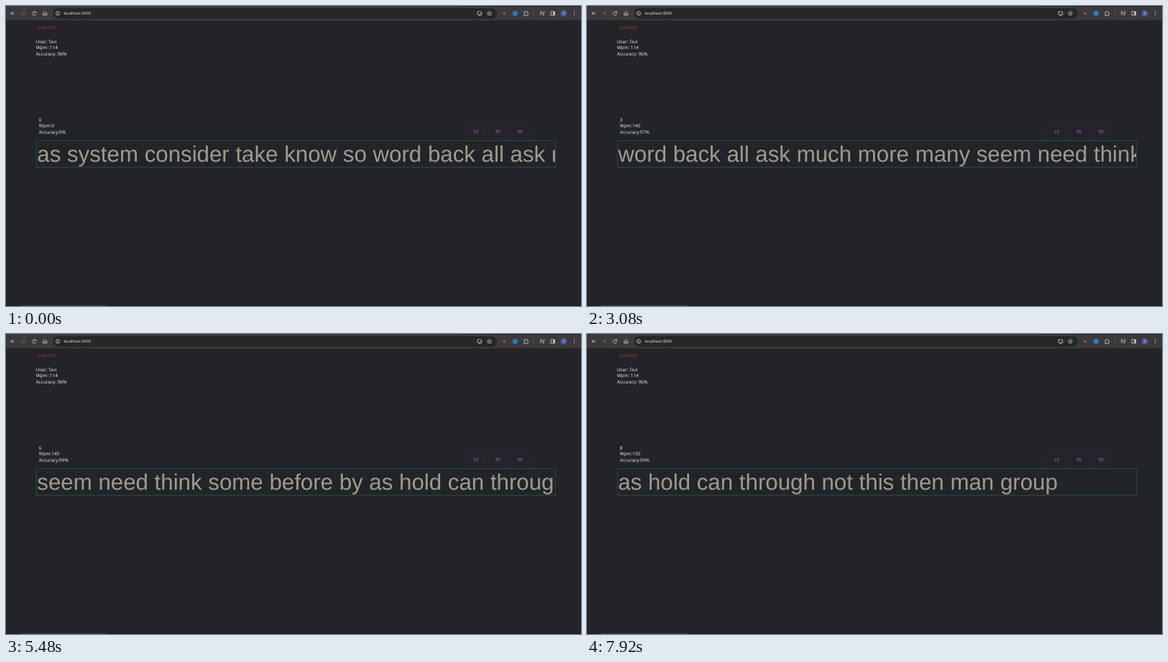
An HTML page for the animation above (8 s loop, 800 px wide and 418 px high).

```html
<!DOCTYPE html>
<html lang="en">
<head>
<meta charset="utf-8">
<title>Typing test</title>
<style>
  html, body { margin: 0; width: 100%; height: 100%; overflow: hidden; background: #222428; }
  svg { display: block; }
  text { white-space: pre; text-rendering: geometricPrecision; }
  .ui { font: 6.4px "Noto Sans", "Open Sans", sans-serif; fill: #e8e8e8; }
  .arial { font-family: "Liberation Sans", Arial, sans-serif; }
  .line { font-size: 31.25px; fill: #a09a8f; }
  .icon { fill: none; stroke: #cfcdcf; stroke-width: .8; }
  .pick rect { fill: none; stroke: #3b2842; stroke-width: .8; }
  .pick text { font-size: 6.6px; font-weight: bold; fill: #963fa6; text-anchor: middle; }
  .pointer { fill: none; stroke: #787878; stroke-width: .6; mix-blend-mode: difference; }
</style>
</head>
<body>
<svg width="800" height="418" viewBox="0 0 800 418">
  <rect width="800" height="418" fill="#222428"/>

  <!-- browser bar -->
  <rect width="800" height="20" fill="#3b393c"/>
  <path d="M630 .5H800" stroke="#2c2a2d"/>
  <rect x="65" y="3" width="618" height="15" rx="7.5" fill="#272628"/>
  <g class="icon">
    <path d="M12 10.2H7M9.3 7.8L6.9 10.2L9.3 12.6"/>
    <path d="M21.5 10.2h5M24.2 7.8l2.4 2.4l-2.4 2.4" stroke="#78767a"/>
    <path d="M41 8.6A2.5 2.5 0 1 0 41.6 11M41.7 7.2V9.2H39.6"/>
    <path d="M51.8 9.6L54.3 7.5L56.8 9.6V12.9H55.2V10.8H53.4V12.9H51.8Z"/>
    <circle cx="72" cy="10.3" r="2.6"/>
    <path d="M72 9.8V11.9M72 8.4V9.1"/>
    <path d="M659 7.8H656V12H662.2V10.6M657.5 13.2H660.7M661 7V10M659.6 8.8L661 10.2L662.4 8.8"/>
    <path d="M672.5 7.2l.9 2l2.1.2l-1.6 1.4l.5 2.1l-1.9-1.1l-1.9 1.1l.5-2.1l-1.6-1.4l2.1-.2Z"/>
    <path d="M720.8 8.3H722.4a1 1 0 0 1 2 0H725.8V10a1 1 0 0 1 0 2V13.2H720.8V11.8a1 1 0 0 0 0-2Z"/>
    <path d="M734.5 6.5V14" stroke="#5c5a5e"/>
    <path d="M742.8 8.2H746.6M742.8 10H746.6M742.8 11.8H745M748.2 12V8.2H749.6"/>
    <circle cx="747.4" cy="12" r=".7"/>
    <rect x="758" y="7.8" width="5.6" height="5"/>
    <path d="M762.3 8V12.6" stroke-width="2"/>
  </g>
  <circle cx="693" cy="10.3" r="1.9" fill="#a34a74"/>
  <rect x="705.2" y="7.2" width="6.2" height="6.2" fill="#2b7fbd"/>
  <circle cx="776" cy="10.3" r="4.3" fill="#4a5fae"/>
  <text class="ui" x="776" y="12" text-anchor="middle" style="font-size:4.6px">T</text>
  <g fill="#cfcdcf">
    <circle cx="790.7" cy="8" r=".65"/><circle cx="790.7" cy="10.3" r=".65"/><circle cx="790.7" cy="12.6" r=".65"/>
  </g>
  <text class="ui" x="80.5" y="12.2" style="font-size:5.5px">localhost:3000</text>

  <!-- account -->
  <text class="arial" x="44.8" y="32" font-size="5.9" letter-spacing=".17" fill="#c0353f">LOGOUT</text>
  <g class="ui">
    <text x="41.7" y="51.5">User: Tavi</text>
    <text x="41.7" y="60.3">Wpm: 114</text>
    <text x="41.7" y="69.1">Accuracy: 96%</text>
    <text id="secs" x="45.8" y="160.7"></text>
    <text id="wpm" x="45.8" y="169.4"></text>
    <text id="acc" x="45.8" y="178.1"></text>
  </g>

  <g class="pick arial">
    <rect x="640.4" y="166.4" width="26" height="17.4" rx="1.6"/><text x="653.5" y="177.2">10</text>
    <rect x="671.4" y="166.4" width="26" height="17.4" rx="1.6"/><text x="684.3" y="177.2">30</text>
    <rect x="702.2" y="166.4" width="26" height="17.4" rx="1.6"/><text x="715.2" y="177.2">50</text>
  </g>

  <!-- typing line -->
  <rect x="42.3" y="187.4" width="722.4" height="37.3" fill="none" stroke="#2c544d" stroke-width=".8"/>
  <svg x="42" y="188" width="722" height="36" overflow="hidden">
    <text class="arial line" x="1.3" y="28.9"><tspan id="done" fill="#4f9a72"></tspan><tspan id="rest"></tspan></text>
  </svg>
  <path class="pointer" d="M333.4 203.6h1.2l.7.6l.7-.6h1.2M335.3 204.2V212M333.4 212.6h1.2l.7-.6l.7.6h1.2"/>

  <path d="M0 417.5H800" stroke="#191a1d"/>
  <path d="M20 417.5H140" stroke="#434448"/>
</svg>
<script>
const WORDS = "as system consider take know so word back all ask much more many seem need " +
  "think some before by as hold can through not this then man group";

// [ms, next word]: the typist reaches these words at these times, at an even pace between them
const PACE = [[0, "as"], [1600, "take"], [3080, "word"], [4160, "ask"], [5480, "seem"], [7080, "before"],
  [7920, "as hold"]].map(([ms, word]) => [ms, WORDS.indexOf(word)]);

const LOOP = 8000, STEP = 40;
const EARLIER = 13;       // characters typed before the line begins
const MISTAKE_AFTER = 30; // the only wrong key comes by this character

const set = (id, text) => { document.getElementById(id).textContent = text; };

function typedAt(t) {
  const next = PACE.findIndex(([ms]) => ms > t);
  if (next < 0) return PACE[PACE.length - 1][1];
  const [t0, n0] = PACE[next - 1], [t1, n1] = PACE[next];
  return Math.floor(n0 + (n1 - n0) * (t - t0) / (t1 - t0) + 1e-6);
}

// Scores change only when a second passes; a word counts as five characters.
function score(secs) {
  if (!secs) return [0, 0];
  const count = typedAt(secs * 1000 - 800) + EARLIER;
  const wrong = count > MISTAKE_AFTER ? 1 : 0;
  return [Math.floor(count / 5) * 60 / secs, 100 * (count - wrong) / count].map(Math.round);
}

function draw(t) {
  const typed = typedAt(t);
  const start = WORDS.lastIndexOf(" ", typed - 1) + 1;
  set("done", WORDS.slice(typed ? start : 0, typed));
  set("rest", WORDS.slice(typed));

  const secs = Math.floor((t + 800) / 1000);
  const [wpm, accuracy] = score(secs);
  set("secs", secs);
  set("wpm", "Wpm:" + wpm);
  set("acc", "Accuracy:" + accuracy + "%");
}

const begin = performance.now();
function tick() {
  const t = (performance.now() - begin) % LOOP;
  draw(Math.floor(t / STEP) * STEP);
  requestAnimationFrame(tick);
}
tick();
</script>
</body>
</html>
```
